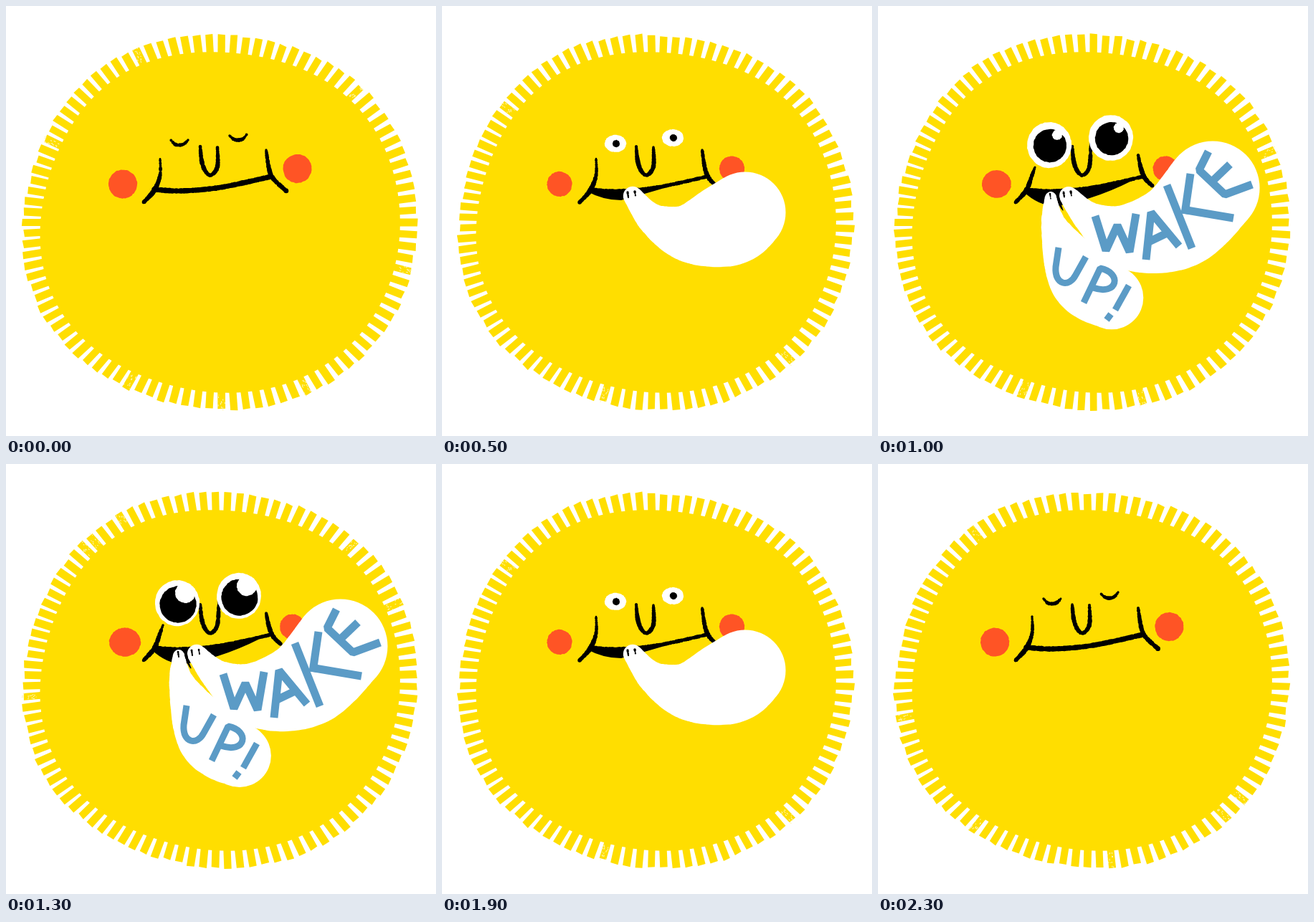
An HTML page with a canvas for the animation above (2400 ms loop, 600 by 600 pixels).

```html
<!DOCTYPE html>
<html lang="en">
<head>
<meta charset="utf-8">
<title>Wake up!</title>
<style>
html, body { margin: 0; width: 100%; height: 100%; overflow: hidden; background: #fff; }
canvas { display: block; width: 600px; height: 600px; }
</style>
</head>
<body>
<canvas id="stage" width="600" height="600" role="img" aria-label="A smiling sun says: WAKE UP!"></canvas>
<script>
const ctx = document.getElementById('stage').getContext('2d');
const YELLOW = '#ffde00', RED = '#ff5425', BLUE = '#5b9bc6', BLACK = '#000', WHITE = '#fff';
const TAU = Math.PI * 2;
const STEP = 100, POSES = 12;
const CX = 299, CY = 302, RAYS = 100, RAY_LEN = 24;

// Bubbles are thick strokes along a spine of [x, y, width].
const WAKE_MID = [[266,265,26],[296,299,44],[345,317,80],[398,305,116],[423,288,113]];
const WAKE_FULL = [[266,265,26],[298,298,46],[350,322,90],[418,306,122],[467,254,131]];
const UP_MID = [[241,267,16],[246,310,37],[262,347,66],[281,381,90]];
const UP_FULL = [[241,267,16],[247,310,38],[284,380,90],[326,407,88]];

const WAKE = [
  [[303,293],[318,341],[334,306],[351,343],[360,290]],
  [[374,354],[381,288],[420,335]], [[378,329],[403,317]],
  [[403,250],[438,338]], [[436,234],[428,290]], [[425,284],[496,296]],
  [[461,203],[448,229],[484,263],[522,249]], [[467,244],[491,221]]
];

let seed = 1;
function rand() {
  seed = (seed * 1664525 + 1013904223) >>> 0;
  return seed / 4294967296;
}
const jit = a => (rand() * 2 - 1) * a;
const lerp = (a, b, k) => a + (b - a) * k;
const ramp = (v, a, b) => Math.max(0, Math.min(1, (v - a) / (b - a)));
const mix = (p, q, k) => p.map((v, i) => lerp(v, q[i], k));

function spline(a, b, c, d, t) {
  return .5 * (2 * b + (c - a) * t + (2 * a - 5 * b + 4 * c - d) * t * t
    + (3 * b - a - 3 * c + d) * t * t * t);
}

// Crayon stroke through points [x, y, width].
function brush(pts, color = BLACK) {
  const last = pts.length - 1;
  ctx.fillStyle = color;
  ctx.beginPath();
  for (let i = 0; i < last; i++) {
    const q = [i - 1, i, i + 1, i + 2].map(k => pts[Math.max(0, Math.min(last, k))]);
    const n = Math.ceil(Math.hypot(q[2][0] - q[1][0], q[2][1] - q[1][1]));
    for (let s = 0; s <= n; s++) {
      const [x, y, w] = [0, 1, 2].map(c => spline(q[0][c], q[1][c], q[2][c], q[3][c], s / n));
      const r = Math.max(.5, w / 2 + jit(.4));
      ctx.moveTo(x + r, y);
      ctx.arc(x, y, r, 0, TAU);
    }
  }
  ctx.fill();
}

function disc(x, y, rx, ry, color) {
  ctx.fillStyle = color;
  ctx.beginPath();
  for (let a = 0; a < TAU; a += .1) {
    const d = jit(.4);
    ctx.lineTo(x + Math.cos(a) * (rx + d), y + Math.sin(a) * (ry + d));
  }
  ctx.fill();
}

// Squarish ellipse that bulges at the lower left.
function radius(a) {
  return 270.5 + 6.7 * Math.cos(2 * a) - 2.3 * Math.cos(4 * a)
    - 2.2 * Math.sin(4 * a) * (1 - Math.cos(a));
}

function sun(p) {
  ctx.fillStyle = YELLOW;
  ctx.beginPath();
  for (let a = 0; a < TAU; a += .04) {
    const r = radius(a) - RAY_LEN;
    ctx.lineTo(CX + Math.cos(a) * r, CY + Math.sin(a) * r);
  }
  ctx.fill();
  for (let i = 0; i < RAYS; i++) {
    const u = (i + p % 2 / 2) / RAYS * TAU;
    const a = u + .06 * Math.sin(u) - .03 * Math.sin(2 * u);
    const r = radius(a), end = r + jit(1.8), w = 5.2 + jit(.4), lean = jit(.6);
    ctx.save();
    ctx.translate(CX, CY);
    ctx.rotate(a);
    ctx.fillStyle = YELLOW;
    ctx.beginPath();
    ctx.moveTo(r - 28, -w);
    ctx.lineTo(end + lean, -w);
    ctx.lineTo(end - lean, w);
    ctx.lineTo(r - 28, w);
    ctx.fill();
    if (rand() < .06) {
      ctx.fillStyle = '#fff6b8';
      for (let k = 0; k < 14; k++) ctx.fillRect(r - rand() * 22, jit(w), 1 + rand() * 2, 1);
    }
    ctx.restore();
  }
}

function cheeks(p) {
  const awake = ramp(p, 3, 5), wide = ramp(p, 8, 11), size = lerp(20, 17.5, awake);
  disc(163 + awake + wide * 2, 248.5, size + wide * 4.5, size + wide * 2.5, RED);
  disc(406.5 - awake * 2 - wide * 5, 227, size, size, RED);
}

function mouth(p, open) {
  if (p > 3) {
    ctx.fillStyle = BLACK;
    ctx.beginPath();
    ctx.moveTo(206, 255);
    ctx.quadraticCurveTo(290, 262, 371, 235);
    ctx.quadraticCurveTo(310, lerp(255, 269, open), 250, lerp(271, 279, open));
    ctx.quadraticCurveTo(225, lerp(271, 280, open), 203, 259);
    ctx.fill();
  }
  const w = lerp(7, 5, ramp(p, 3, 4));
  brush([[207,256,w],[245,258,w],[300,253,w],[370,238,w]]);
  brush([[lerp(215, 219, open), lerp(213, 225, open), 3],[215,236,5],[207,257,6.5],[192,274,5]]);
  brush([[363, lerp(201, 208, open), 4],[367,227,6],[373,241,6],p < 4 ? [391,258,6] : [383,251,5]]);
}

// Grow from the lips to mid size (1), then to full size (2).
function bubble(mid, full, grow) {
  if (!grow) return;
  const root = mid[0];
  brush(mid.map((q, i) => grow < 1 ? mix(root, q, grow) : mix(q, full[i], grow - 1)), WHITE);
}

function stroke(pts, width) {
  ctx.lineWidth = width;
  ctx.beginPath();
  pts.forEach(q => ctx.lineTo(...q));
  ctx.stroke();
}

function words(p) {
  ctx.strokeStyle = BLUE;
  ctx.lineJoin = 'bevel';
  if (p >= 7) WAKE.forEach(s => stroke(s, 11));
  if (p >= 10) {
    ctx.lineWidth = 9;
    ctx.beginPath();
    ctx.moveTo(252, 337);
    ctx.lineTo(248, 364);
    ctx.bezierCurveTo(246, 390, 267, 393, 276, 375);
    ctx.lineTo(290, 350);
    ctx.moveTo(287, 414);
    ctx.lineTo(310, 366);
    ctx.bezierCurveTo(341, 372, 335, 405, 300, 393);
    ctx.stroke();
    stroke([[350,390],[331,424]], 9);
    stroke([[325,430],[319,438]], 9);
  }
}

function lid(x, y, tilt) {
  brush([[x - 12, y - 7 + tilt, 3],[x - 6,y - 1,4.5],[x + 1,y,5],[x + 7,y - 2,4.5],[x + 12,y - 7 - tilt,3]]);
}

function eye(x, y, open, pupil, shine) {
  disc(x, y, lerp(15, 31, open), lerp(12, 32, open), WHITE);
  disc(x + 1, y + shine / 7, pupil, pupil, BLACK);
  if (shine) disc(x + 11, y - 14, shine, shine, WHITE);
}

function face(p, open) {
  brush([[271,196,4],[273,216,6],[278,230,5.5],[286,236,5],[295,224,6],
         [lerp(295, 297, open), lerp(197, 190, open), 4]]);
  if (p < 4) {
    lid(242 + p % 2, 194 + p % 2, 0);
    lid(324 - p % 2, 187, 1);
    return;
  }
  const pupil = lerp(5, 18.5, open) + 7 * ramp(p, 8, 11);
  const shine = 14 * ramp(p, 9, 11);
  eye(lerp(242, 239, open), lerp(192, 194, open), open, pupil, shine);
  eye(lerp(322, 325, open), 184, open, pupil, shine);
}

function teeth(p) {
  if (p >= 5) {
    brush([[259,260,3],[260,267,1.5]]);
    brush([[269,259,3],[270,265,1.5]]);
  }
  if (p >= 8) {
    brush([[240,262,3],[241,269,1.5]]);
    brush([[251,266,4],[254,277,3],[258,285,1]]);
  }
}

function draw(p) {
  const open = ramp(p, 5, 8);
  seed = 977 + p * 7919;
  ctx.fillStyle = WHITE;
  ctx.fillRect(0, 0, 600, 600);
  sun(p);
  cheeks(p);
  mouth(p, open);
  bubble(UP_MID, UP_FULL, 2 * ramp(p, 6, 10));
  bubble(WAKE_MID, WAKE_FULL, 2 * ramp(p, 3, 7));
  teeth(p);
  words(p);
  face(p, open);
}

// Poses run forwards, then back.
const start = performance.now();
let shown = -1;
function tick() {
  const k = Math.floor((performance.now() - start) / STEP) % (POSES * 2);
  const p = Math.min(k, POSES * 2 - k);
  if (p !== shown) draw(shown = p);
  requestAnimationFrame(tick);
}
tick();
</script>
</body>
</html>
```
